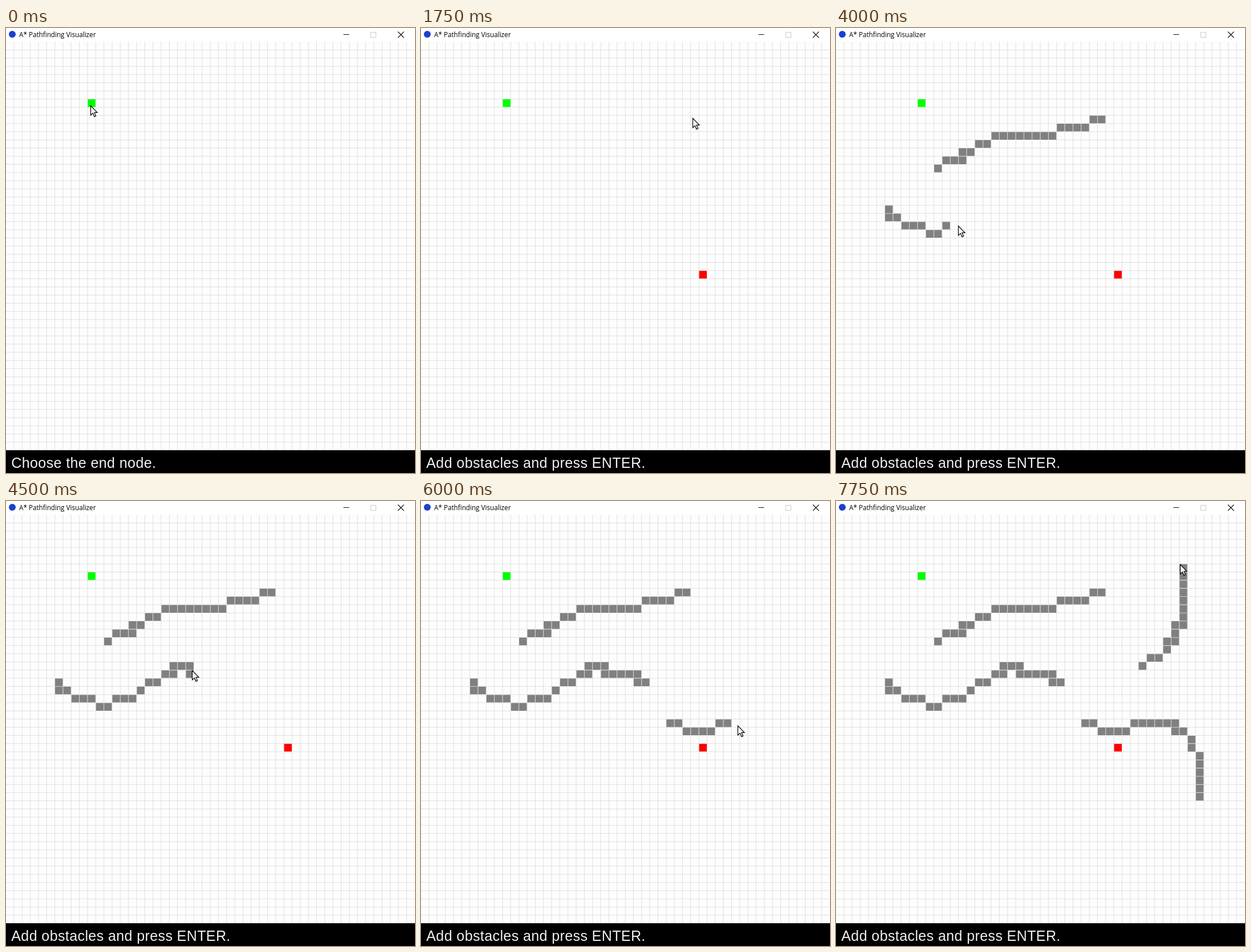
Recreate the animation shown at these times as an HTML page. Size 717 px wide and 781 px high, loop 8000 ms.

```html
<!DOCTYPE html>
<html lang="en">
<head>
<meta charset="utf-8">
<title>A* Pathfinding Visualizer</title>
<style>
  html, body { margin: 0; width: 100%; height: 100%; overflow: hidden; background: #fdfdfd; }
  svg { display: block; width: 717px; height: 781px; }
  .title { font: 11.7px "Open Sans", "Noto Sans", sans-serif; }
  .status { font: 25px "Liberation Sans", Arial, sans-serif; letter-spacing: .4px; fill: #f0f0f0; }
</style>
</head>
<body>
<svg viewBox="0 0 717 781">
  <rect width="717" height="781" fill="#fdfdfd"/>
  <path id="grid" stroke="#dcdcdc" stroke-width=".9"/>
  <rect width="717" height="24" fill="#fff"/>
  <circle cx="11" cy="11" r="6" fill="#1c3fd0"/>
  <text class="title" x="23" y="15.5">A* Pathfinding Visualizer</text>
  <g fill="none" stroke="#111">
    <path d="M591.5 11.5h10"/>
    <rect x="639.5" y="7.5" width="9" height="9" stroke="#ccc"/>
    <path d="M687 6.5l10.5 10.5M697.5 6.5l-10.5 10.5" stroke-width="1.1"/>
  </g>
  <path id="walls" fill="#808080"/>
  <path id="start" fill="#0f0"/>
  <path id="goal" fill="#f00"/>
  <rect y="741" width="717" height="40"/>
  <text class="status" id="status" x="9.3" y="772.3"></text>
  <path id="cursor" d="M.5 .5V17L4.3 13.4L7 19.6L9.6 18.5L7 12.4H12Z"
        fill="#fff" stroke="#000" stroke-width="1.2"/>
</svg>
<script>
const LOOP = 8000, STEP = 250, GOAL_TIME = 1250;
const CELLS = 50, SIZE = 717 / CELLS, GAP = 0.9, LEFT = -0.9, TOP = 23.8;
const $ = id => document.getElementById(id);
const mix = (a, b, k) => a + (b - a) * k;

function cellPath(col, row) {
  const side = SIZE - GAP;
  return `M${LEFT + col * SIZE + GAP} ${TOP + row * SIZE + GAP}h${side}v${side}h${-side}z`;
}

// Cells crossed by a polyline of [col, row] points, in drawing order.
function trace(points) {
  const cells = new Set();
  points.slice(1).forEach(([x2, y2], i) => {
    const [x1, y1] = points[i];
    const n = Math.ceil(Math.max(Math.abs(x2 - x1), Math.abs(y2 - y1)));
    for (let j = 0; j <= n; j++) {
      cells.add(cellPath(Math.round(mix(x1, x2, j / n)), Math.round(mix(y1, y2, j / n))));
    }
  });
  return [...cells];
}

const strokes = [
  { from: 1750, to: 3000,
    cells: trace([[32, 9], [26, 10.6], [19, 11.4], [15, 13.4], [15, 13.6], [12, 14.6]]) },
  { from: 3250, to: 4750,
    cells: trace([[6, 20], [6, 20.8], [12, 23.2], [13, 22.4], [15, 21.6], [20, 18.6], [20, 18],
                  [22, 18], [22, 18.6], [26, 19.4], [26, 19.6], [27, 20]]) },
  { from: 5500, to: 6500,
    cells: trace([[30, 25], [32, 25.6], [35, 25.5], [41, 25], [41, 25.8], [43, 27],
                  [43, 28], [44, 29], [44, 34]]) },
  { from: 7125, to: 7750,
    cells: trace([[37, 17.8], [39, 16.6], [40, 16], [40, 15], [41, 15], [41, 13],
                  [42, 13], [42, 6]]) }
];

// Each stroke gathers speed after the press.
function drawnCells({ from, to, cells }, t) {
  const progress = Math.min(Math.max((t - from) / (to - from), 0), 1);
  return cells.slice(0, Math.round(cells.length * progress ** 1.5)).join("");
}

// Pointer key positions: time, x, y.
const pointer = [
  [0, 148, 136], [750, 493, 436], [1250, 493, 436], [1750, 476, 158], [3000, 176, 239],
  [3500, 90, 331], [4000, 214, 347], [4500, 326, 297], [4750, 387, 313], [5500, 450, 377],
  [6000, 555, 394], [6500, 638, 500], [6750, 639, 417], [7250, 533, 288], [7750, 603, 111]
];

function pointerAt(t) {
  const i = Math.max(1, pointer.findIndex(key => key[0] >= t));
  const [t1, x1, y1] = pointer[i - 1], [t2, x2, y2] = pointer[i];
  const k = (t - t1) / (t2 - t1);
  return [mix(x1, x2, k), mix(y1, y2, k)];
}

function render(time) {
  const t = Math.floor((time % LOOP) / STEP) * STEP;
  const goalChosen = t >= GOAL_TIME;
  $("walls").setAttribute("d", strokes.map(s => drawnCells(s, t)).join(""));
  $("goal").style.display = goalChosen ? "" : "none";
  $("status").textContent = goalChosen ? "Add obstacles and press ENTER." : "Choose the end node.";
  $("cursor").setAttribute("transform", `translate(${pointerAt(t)})`);
}

let grid = "";
for (let i = 1; i < CELLS; i++) {
  const offset = i * SIZE + GAP / 2;
  grid += `M${LEFT + offset} 24V741M0 ${TOP + offset}H717`;
}
$("grid").setAttribute("d", grid);
$("start").setAttribute("d", cellPath(10, 7));
$("goal").setAttribute("d", cellPath(34, 28));

const origin = performance.now();
function tick() {
  render(performance.now() - origin);
  requestAnimationFrame(tick);
}
tick();
</script>
</body>
</html>
```
